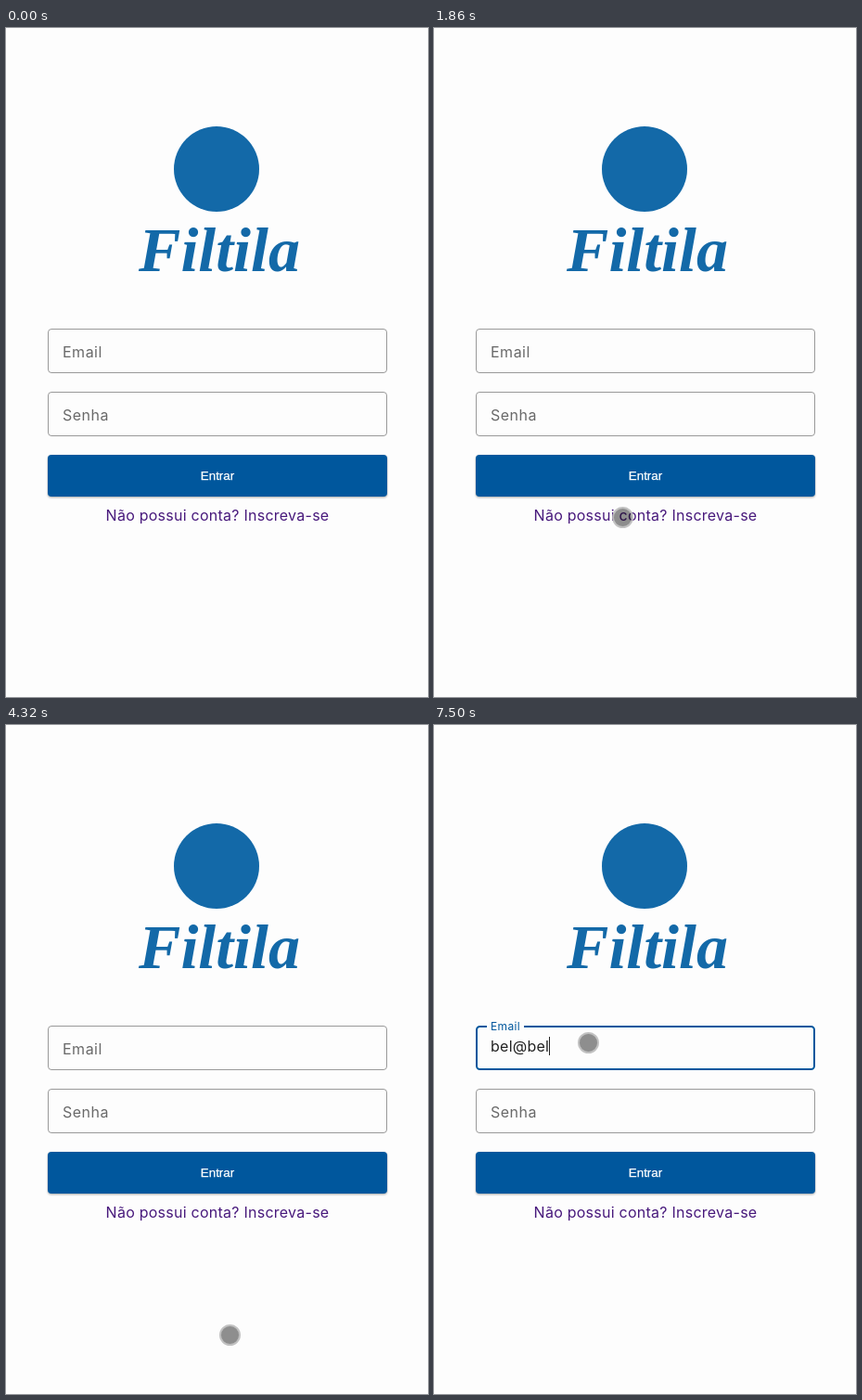
An HTML page for the animation above (8000 ms loop, 455x721 px).

```html
<!DOCTYPE html>
<html lang="pt">
<head>
<meta charset="utf-8">
<title>Login</title>
<style>
  html, body { margin: 0; width: 100%; height: 100%; overflow: hidden; background: #fdfdfd; }
  svg { display: block; width: 455px; height: 721px; }
  text { font: 16px Inter, sans-serif; letter-spacing: .25px; white-space: pre; }
  .brand { font: italic bold 68px "Liberation Serif", serif; letter-spacing: 0; fill: #1369a8; }
  .box { fill: none; stroke: #999; }
  .label { fill: #696969; letter-spacing: .5px; }
  .button { fill: #00579d; filter: drop-shadow(0 1px 1px rgba(0, 0, 0, .35)); }
  .action { font: 13.333px "Liberation Sans", sans-serif; letter-spacing: 0; fill: #fff; stroke: #fff; stroke-width: .25; }
  .link { fill: #48197c; }
  .mid { text-anchor: middle; }
  .focus .box { stroke: #00579d; stroke-width: 2; }
  .focus .label { fill: #00579d; }
</style>
</head>
<body>
<svg viewBox="0 0 455 721">
  <circle cx="227" cy="152" r="46" fill="#1369a8"/>
  <text class="brand mid" x="230" y="262">Filtila</text>
  <g id="login"></g>
  <g id="signup"></g>
  <text id="typed" x="61" y="352" fill="#222"></text>
  <rect id="caret" y="336" width="1" height="20" fill="#222"/>
  <g id="pointer">
    <circle r="10" fill="#000" fill-opacity=".44"/>
    <circle r="10.5" fill="none" stroke="#bbb" stroke-opacity=".9" stroke-width="2"/>
  </g>
</svg>
<script>
const LOOP = 8000, STEP = 60, BLINK = 530;
const APPEAR = 360, OPEN_SIGNUP = 2220, OPEN_LOGIN = 4260, FOCUS = 5160;
const $ = id => document.getElementById(id);

const field = (name, y) => `<g>
  <rect class="box" x="45.5" y="${y + .5}" width="365" height="47" rx="3.5"/>
  <rect class="notch" x="57" y="${y - 1}" width="0" height="4" fill="#fdfdfd"/>
  <text class="label" transform="translate(61 ${y + 31})">${name}</text></g>`;

function form(id, names, action, link) {
  const y = 324 + names.length * 68;
  $(id).innerHTML = names.map((name, i) => field(name, 324 + i * 68)).join('') + `
    <rect class="button" x="45" y="${y}" width="366" height="45" rx="4"/>
    <text class="action mid" x="228" y="${y + 27}">${action}</text>
    <text class="link mid" x="228" y="${y + 71}">${link}</text>`;
}
form('login', ['Email', 'Senha'], 'Entrar', 'Não possui conta? Inscreva-se');
form('signup', ['Nome', 'Email', 'Senha', 'Foto'], 'Inscrever', 'Já possui conta? Entre aqui');

const [box, notch, label] = $('login').firstElementChild.children;

// Each move ends at (x, y) and bows sideways on the way.
const home = { x: 395, y: 108 };
const moves = [
  { from: APPEAR, to: 1080, x: 236, y: 376, bow: -155 },
  { from: 1080, to: 1860, x: 203.5, y: 527.5, bow: 28 },
  { from: OPEN_SIGNUP, to: 2760, x: 191, y: 345, bow: 0 },
  { from: 3060, to: 3780, x: 241.5, y: 657.5, bow: 4 },
  { from: 4320, to: 5040, x: 166.5, y: 342.5, bow: 0 }
];
// Keys within a burst follow one another every step.
const bursts = [[6000, 'bel'], [6420, '@'], [7020, 'b'], [7440, 'el']];
const keys = bursts.flatMap(([at, word]) =>
  [...word].map((char, i) => ({ at: at + i * STEP, char })));

const clamp = v => Math.max(0, Math.min(1, v));
const easeOut = (u, power) => 1 - (1 - u) ** power;
const show = (node, on) => node.style.display = on ? '' : 'none';
const set = (node, attrs) => { for (const k in attrs) node.setAttribute(k, attrs[k]); };

function drawPointer(t) {
  let { x, y } = home;
  for (const m of moves) {
    const u = easeOut(clamp((t - m.from) / (m.to - m.from)), 1.4);
    x += (m.x - x) * u + m.bow * Math.sin(Math.PI * u);
    y += (m.y - y) * u;
  }
  show($('pointer'), t >= APPEAR);
  set($('pointer'), { transform: `translate(${x} ${y})` });
}

function drawEmail(t) {
  const focus = t >= FOCUS;
  const lift = easeOut(clamp((t - FOCUS + STEP) / 200), 3);
  const inset = focus ? 1 : .5;
  box.parentNode.classList.toggle('focus', focus);
  set(box, { x: 45 + inset, y: 324 + inset, width: 366 - 2 * inset, height: 48 - 2 * inset });
  set(notch, { width: 40 * lift });
  set(label, { transform: `translate(61 ${355 - 26 * lift}) scale(${1 - .25 * lift})` });

  const pressed = keys.filter(k => k.at <= t);
  const lastAt = pressed.length ? pressed[pressed.length - 1].at : FOCUS;
  $('typed').textContent = pressed.map(k => k.char).join('');
  const width = pressed.length ? $('typed').getComputedTextLength() : 0;
  set($('caret'), { x: 61 + Math.round(width) });
  show($('caret'), focus && Math.floor((t - lastAt) / BLINK) % 2 === 0);
}

function draw(time) {
  const t = Math.floor(time % LOOP / STEP) * STEP;
  const signup = t >= OPEN_SIGNUP && t < OPEN_LOGIN;
  show($('signup'), signup);
  show($('login'), !signup);
  drawEmail(t);
  drawPointer(t);
}

const start = performance.now();
function tick() {
  draw(performance.now() - start);
  requestAnimationFrame(tick);
}
tick();
</script>
</body>
</html>
```
